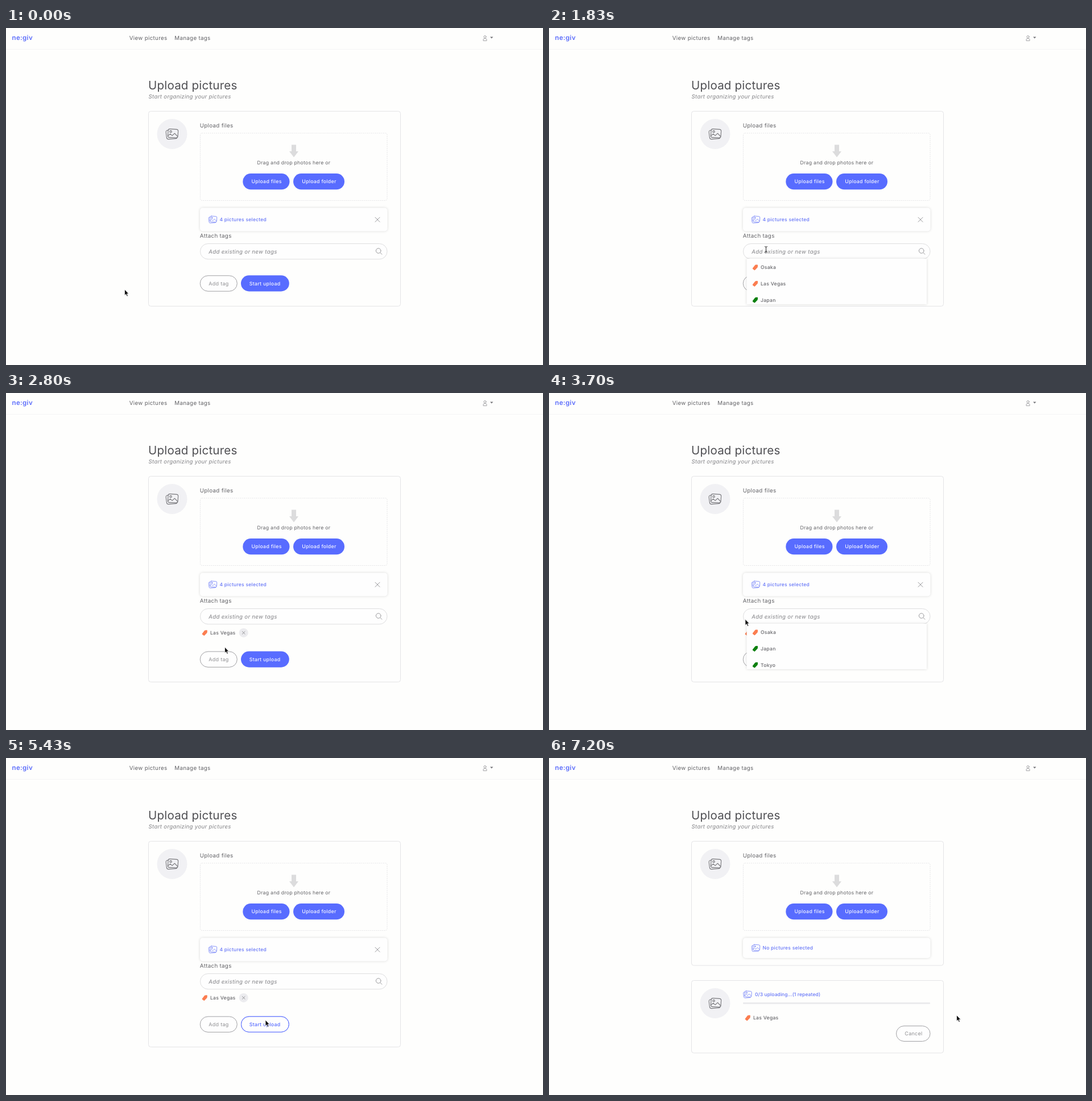
Write an HTML page that moves like this. It is 944 by 593 pixels and loops after 8 s.

```html
<!DOCTYPE html>
<html lang="en">
<head>
<meta charset="utf-8">
<title>Upload pictures</title>
<style>
html, body { margin: 0; width: 100%; height: 100%; overflow: hidden; background: #fefefd; }
svg { display: block; width: 944px; height: 593px; }
text { font: 9.8px Inter, Roboto, sans-serif; letter-spacing: .03em; fill: #636367; text-rendering: geometricPrecision; }
.brand { font-size: 11.5px; font-weight: 600; fill: #5a6bfb; }
.title { font-size: 20.6px; letter-spacing: .008em; fill: #505054; }
.hint { font-size: 9.7px; font-style: italic; fill: #838387; }
.small { font-size: 8.7px; }
.btn { font-size: 8.8px; font-weight: 500; fill: #f4f5ff; }
.ghost { font-size: 9px; fill: #909093; }
.note { font-size: 8.5px; font-weight: 500; fill: #6575f7; }
.tag { font-size: 8.6px; font-weight: 500; fill: #67676b; }
.blue { fill: #586cff; }
.card { fill: none; stroke: #e4e4e6; }
.field { fill: #fefefe; stroke: #dededf; }
.pill { fill: #fefefe; stroke: #a0a0a3; }
.raised { fill: #fefefe; filter: drop-shadow(0 0 2px #00000026); }
.line { fill: none; stroke: #98989b; stroke-linecap: round; stroke-linejoin: round; }
.orange { fill: #fb7d50; }
.green { fill: #0b800f; }
</style>
</head>
<body>
<svg viewBox="0 0 944 593">
  <defs>
    <g id="photos" fill="none" stroke-width="1.1" stroke-linejoin="round" stroke-linecap="round">
      <rect x="-7.3" y="-8.6" width="17.6" height="15" rx="3.2" transform="rotate(4)"/>
      <path d="M-7.5-6.6Q-11.2-6.2-10.8-3L-9.6 6.3Q-9.1 9.4-6 9.1L6 8.3Q8 8.2 8.4 7M-7.6 3.4l4.3-3.6 3.5 3 4.2-4 5 5.2"/>
      <circle cx="-2.4" cy="-4.2" r="1.7"/>
    </g>
    <path id="label" d="M-4.5 1.4L-.3-4Q.2-4.6 1-4.6L3.5-4.8Q4.6-4.8 4.6-3.7L4.4-1Q4.4-.4 3.9.2L-.4 4.7Q-1.2 5.3-2 4.6L-4.3 2.8Q-4.9 2.2-4.5 1.4Z"/>
    <g id="badge">
      <circle r="26.5" fill="#f1f1f4"/>
      <use href="#photos" stroke="#77777b"/>
    </g>
    <g id="uploads">
      <rect class="card" x="250.5" y="391.5" width="443" height="127.5" rx="4"/>
      <use href="#badge" x="292" y="431.5"/>
      <use href="#photos" transform="translate(349 416) scale(.68)" stroke="#6575f7"/>
      <text class="note" x="362" y="419" style="letter-spacing:.01em">0/3 uploading...(1 repeated)</text>
      <rect x="341" y="430" width="329" height="3" rx="1" fill="#ebebed"/>
      <use href="#label" class="orange" x="349.3" y="457.3"/>
      <text class="tag" x="359" y="460.2">Las Vegas</text>
      <rect class="pill" x="610.5" y="471.5" width="59.5" height="27" rx="13.5"/>
      <text class="ghost" x="625.3" y="488.3">Cancel</text>
    </g>
  </defs>

  <text class="brand" x="10.5" y="21">ne:giv</text>
  <text x="216.8" y="21">View pictures</text>
  <text x="296.3" y="21">Manage tags</text>
  <g class="line" stroke-width=".9">
    <circle cx="842" cy="15.5" r="2"/>
    <path d="M839 22v-1.5q0-1.8 1.8-1.8h2.4q1.8 0 1.8 1.8V22Z"/>
  </g>
  <path d="M851 15.5h5.4l-2.7 3Z" fill="#77777b"/>
  <path d="M0 37.5H944" stroke="#f5f5f5"/>

  <text class="title" x="250" y="107.6">Upload pictures</text>
  <text class="hint" x="250.6" y="124">Start organizing your pictures</text>

  <rect id="card" class="card" x="250.5" y="146.5" width="443" height="343" rx="4"/>
  <use href="#badge" x="292" y="186.5"/>
  <text x="340.7" y="174.7">Upload files</text>
  <rect x="341.5" y="185" width="328.5" height="118.5" rx="3" fill="none" stroke="#e5e5e7" stroke-dasharray="2 1.5"/>
  <path d="M502 205.5h8V217h4l-8 10.5-8-10.5h4Z" fill="#dcdcdd"/>
  <text class="small" x="441.5" y="240.3">Drag and drop photos here or</text>
  <rect class="blue" x="416.3" y="256" width="82.2" height="28.3" rx="14.1"/>
  <text class="btn" x="431.5" y="273.4">Upload files</text>
  <rect class="blue" x="505" y="256" width="90" height="28.3" rx="14.1"/>
  <text class="btn" x="520.2" y="273.4">Upload folder</text>

  <g id="form">
    <rect class="raised" x="341" y="316.5" width="329.5" height="41" rx="5"/>
    <use href="#photos" transform="translate(363.5 337) scale(.68)" stroke="#6575f7"/>
    <text class="note" x="375.5" y="340">4 pictures selected</text>
    <path class="line" d="M649 333.2l8 8m0-8l-8 8"/>
    <text x="340.8" y="368.8">Attach tags</text>
    <rect class="field" x="341.5" y="379.5" width="328.5" height="27.3" rx="13.6"/>
    <text class="hint" x="356.2" y="396.6">Add existing or new tags</text>
    <path class="line" d="M658 395.5l2.8 2.8M659 392a4.3 4.3 0 1 1-8.6 0a4.3 4.3 0 1 1 8.6 0"/>
    <g id="chip">
      <use href="#label" class="orange" x="349.3" y="422"/>
      <text class="tag" x="359" y="425">Las Vegas</text>
      <circle cx="417.7" cy="421.9" r="8" fill="#ececef"/>
      <path class="line" d="M415.3 419.5l4.8 4.8m0-4.8l-4.8 4.8"/>
    </g>
    <g id="actions">
      <rect class="pill" x="341.3" y="435.8" width="65" height="27.4" rx="13.7"/>
      <text class="ghost" x="356.3" y="452.6">Add tag</text>
      <rect class="blue" x="413" y="435.3" width="84.8" height="28.2" rx="14.1"/>
      <text class="btn" x="427.8" y="452.6">Start upload</text>
      <g id="outlined">
        <rect x="413.5" y="435.8" width="83.8" height="27.2" rx="13.6" fill="#fefefe" stroke="#586cff"/>
        <text class="btn blue" x="427.8" y="452.6">Start upload</text>
      </g>
    </g>
    <g id="menu">
      <rect class="raised" x="347.5" y="406" width="316.5" height="80"/>
      <g id="items"></g>
    </g>
  </g>

  <g id="done">
    <rect class="raised" x="341" y="316.5" width="329.5" height="35.5" rx="5"/>
    <use href="#photos" transform="translate(363.5 334.3) scale(.68)" stroke="#6575f7"/>
    <text class="note" x="375.5" y="337.4">No pictures selected</text>
    <use id="queue" href="#uploads"/>
  </g>

  <g id="cursor">
    <path id="arrow" d="M0 0V10.6L2.4 8.4 4.1 12.3 5.9 11.5 4.3 7.7H7.4Z" fill="#111" stroke="#fff" stroke-width=".8"/>
    <path id="beam" class="line" d="M-2-5Q0-5 0-3.8Q0-5 2-5M0-4V4M-2 5Q0 5 0 3.8Q0 5 2 5" style="stroke:#222"/>
    <path id="hand" d="M-.9 0Q0-1 .9 0V3.6Q2-.1 2.6 3.8 3.7 3 4.2 4.3 5.5 3.7 5.5 5.3V7.5L4.4 11H-1.2L-3.8 7Q-4.3 5.4-2.7 5.6L-.9 7Z" fill="#fff" stroke="#222" stroke-width=".9" stroke-linejoin="round"/>
  </g>
</svg>
<script>
const LOOP = 8000;
const $ = id => document.getElementById(id);
const show = (id, on) => $(id).style.display = on ? '' : 'none';
const clamp = v => Math.min(1, Math.max(0, v));

// time, x, y of the pointer's hot spot
const path = [
  [470, 208.5, 460], [650, 290, 428], [830, 381.5, 387.5],
  [1800, 381.5, 387.5], [1830, 381.5, 389.5], [2330, 384.5, 447],
  [3030, 384.5, 447], [3160, 386, 397],
  [3470, 386, 397], [3700, 345.5, 398], [3800, 287.5, 408.5],
  [4230, 287.5, 408.5], [4440, 402, 488], [4560, 444, 474], [4930, 456, 461],
  [5770, 456, 461], [5860, 550, 442], [5930, 632.5, 453],
  [6200, 632.5, 453], [6330, 716.5, 452.5]
];

function pointer(t) {
  const i = path.findIndex(k => k[0] > t);
  if (i === 0) return path[0].slice(1);
  if (i < 0) return path[path.length - 1].slice(1);
  const [t0, x0, y0] = path[i - 1], [t1, x1, y1] = path[i];
  const p = (t - t0) / (t1 - t0);
  return [x0 + (x1 - x0) * p, y0 + (y1 - y0) * p];
}

const lists = [
  [['Osaka', 'orange'], ['Las Vegas', 'orange'], ['Japan', 'green']],
  [['Osaka', 'orange'], ['Japan', 'green'], ['Tokyo', 'green']]
].map(list => list.map(([name, color], i) => {
  const y = 421.2 + i * 28.7;
  return `<use href="#label" class="${color}" x="362.5" y="${y}"/><text class="tag" x="372" y="${y + 3}">${name}</text>`;
}).join(''));
let shownList = -1;

function draw(t) {
  const tagged = t >= 2800, sent = t >= 5500;
  const [x, y] = pointer(t);

  show('form', !sent);
  show('done', sent);
  show('chip', tagged);
  show('menu', (t >= 770 && t < 2730) || (t >= 3130 && t < 3730));
  if (shownList !== +tagged) $('items').innerHTML = lists[shownList = +tagged];
  $('actions').setAttribute('transform', `translate(0 ${tagged ? 19.2 : 0})`);
  $('card').setAttribute('height', sent ? 218.5 : tagged ? 362 : 343);
  $('outlined').style.opacity = clamp((t - 4560) / 200);
  $('queue').setAttribute('y', t < 7200 ? 75 : 0);

  const beam = !sent && x > 350 && y > 379 && y < 406;
  const hand = t < 5430 && x > 413 && y > 454 && y < 483;
  show('beam', beam);
  show('hand', hand);
  show('arrow', !beam && !hand);
  $('cursor').setAttribute('transform', `translate(${x} ${y})`);
}

const start = performance.now();
function tick() {
  draw((performance.now() - start) % LOOP);
  requestAnimationFrame(tick);
}
tick();
</script>
</body>
</html>
```
